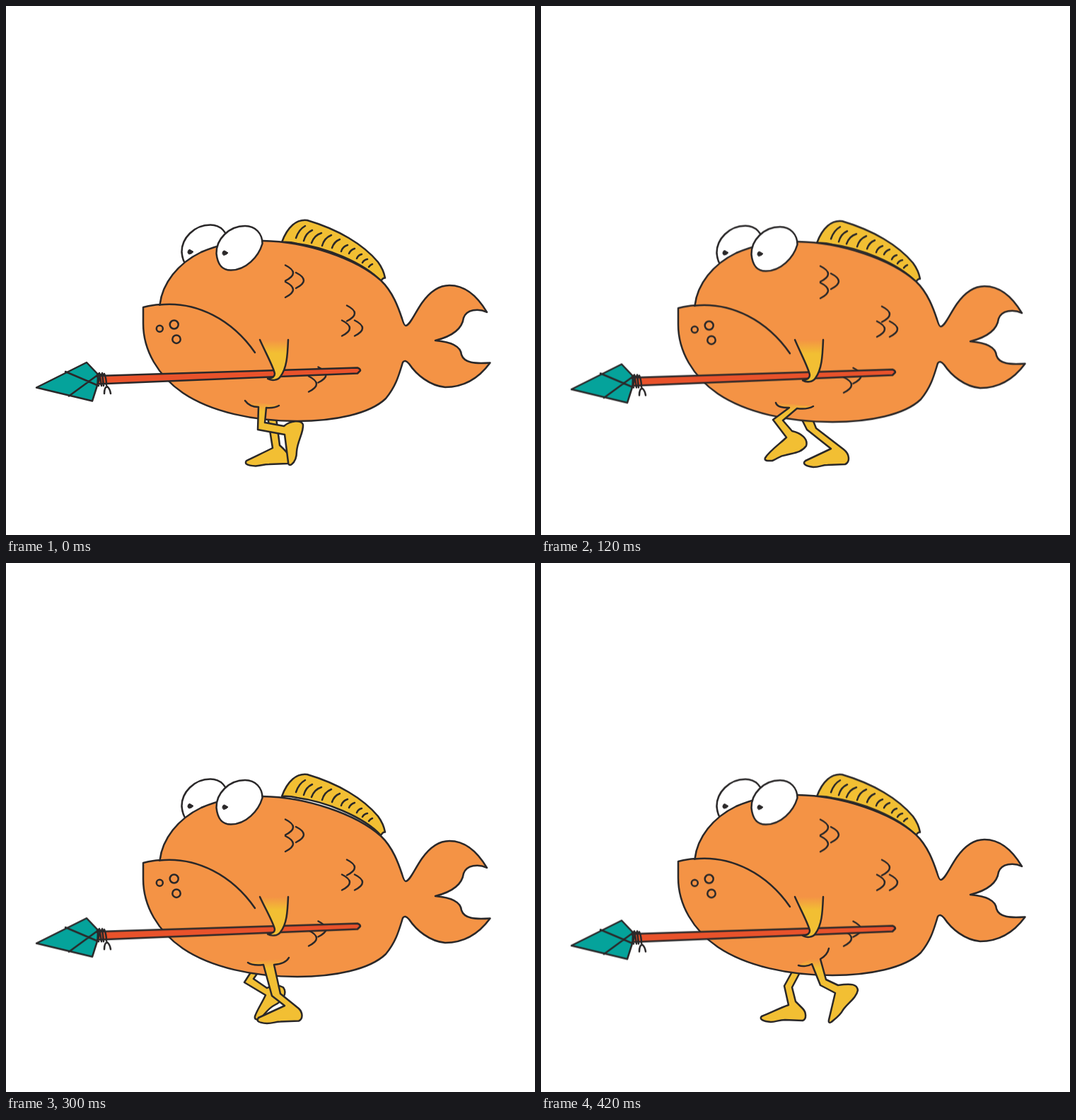
Write an HTML page that moves like this. It is 748 by 748 pixels and loops after 0.48 s.

```html
<!DOCTYPE html>
<html lang="en">
<head>
<meta charset="utf-8">
<title>Marching fish</title>
<style>
  html, body { margin: 0; width: 100%; height: 100%; overflow: hidden; background: #fff; }
  svg { display: block; width: 100%; height: 100%; overflow: hidden; }
  .ink { stroke: #2a2829; stroke-width: 2.5; stroke-linejoin: round; stroke-linecap: round; fill: none; }
  .orange { fill: #f49345; }
  .yellow { fill: #f2bf33; }
  .white { fill: #fff; }
  .red { fill: #e9522b; }
  .teal { fill: #05a39b; }
  .dark { fill: #2a2829; }

  .body, .face, .spear, .arm { animation: 480ms step-end infinite; }
  .body { animation-name: body; }
  .face { animation-name: face; }
  .spear { animation-name: spear; }
  .arm { animation-name: arm; transform-origin: 380px 472px; }

  /* Eight leg poses sit side by side; the strip jumps one stage width per step. */
  .legs { animation: walk 480ms steps(8) infinite; }
  .far { animation-delay: -240ms; }

  @keyframes walk { to { transform: translateX(-5984px); } }
  @keyframes body {
    0% { transform: translateY(0); }
    12.5% { transform: translateY(.7px); }
    25% { transform: translateY(1.2px); }
    37.5% { transform: translateY(-2.6px); }
    50% { transform: translateY(-5px); }
    62.5% { transform: translateY(-2px); }
    75% { transform: translateY(1.2px); }
    87.5% { transform: translateY(-4px); }
  }
  @keyframes face {
    0% { transform: translateY(0); }
    12.5% { transform: translateY(.7px); }
    25% { transform: translateY(1.3px); }
    37.5% { transform: translateY(-5px); }
    50% { transform: translateY(-7.4px); }
    62.5% { transform: translateY(-4px); }
    75% { transform: translateY(0); }
    87.5% { transform: translateY(-3.8px); }
  }
  @keyframes spear {
    0% { transform: translateY(0); }
    12.5% { transform: translateY(1.4px); }
    25% { transform: translateY(2.5px); }
    37.5% { transform: translateY(2.5px); }
    50% { transform: translateY(-1.2px); }
    62.5% { transform: translateY(-1.8px); }
    75% { transform: translateY(-2.4px); }
    87.5% { transform: translateY(1.5px); }
  }
  @keyframes arm {
    0% { transform: none; }
    12.5% { transform: scaleY(1.02); }
    25% { transform: scaleY(1.04); }
    37.5% { transform: scaleY(1); }
    50% { transform: scaleY(.96); }
    62.5% { transform: scaleY(.96); }
    75% { transform: scaleY(.96); }
    87.5% { transform: scaleY(1); }
  }
</style>
</head>
<body>
<svg viewBox="0 0 748 748">
  <defs>
    <linearGradient id="armTint" gradientUnits="userSpaceOnUse" x1="0" y1="472" x2="0" y2="491">
      <stop stop-color="#f49345"/><stop offset="1" stop-color="#f2bf33"/>
    </linearGradient>
    <linearGradient id="legTint" gradientUnits="userSpaceOnUse" x1="0" y1="560" x2="0" y2="573">
      <stop stop-color="#f49345"/><stop offset="1" stop-color="#f2bf33"/>
    </linearGradient>
    <path id="scale" d="M0 0C8 4 11 8 11 11S8 18 0 22"/>
    <g id="eye">
      <path class="white" d="M297.5 350C297 330 315 311 338 311C353 311 362.5 322 362.5 336C357 355 339 373.5 318 373.5C304 373.5 299 364 297.5 350Z"/>
      <path class="dark" stroke-width="1" d="M306 350Q306 346 309 346L314 349Q312 352 308 352.5Z"/>
    </g>
    <g id="strip" fill="url(#legTint)">
      <path d="M338 558C343 565 350 567 357 567L356 599L394 606L399 645C399 649 401 650 404 648C409 644 411 638 411 630C412 615 421 603 420 592C418 585 402 586 393 594L366 589L368 568Q379 569 386 565"/>
      <path transform="translate(748)" d="M335 560C339 566 345 568 353 568L337 593L367 611C362 622 355 632 352 641C351 646 356 647 361 643C366 638 370 630 380 625C392 619 398 608 392 600C385 596 377 597 369 601L350 588L364 568Q377 570 386 565"/>
      <path transform="translate(1496)" d="M332 561C334 567 341 568 351 568L328 585L347 610C339 618 323 629 317 639C315 644 323 643 327 643C335 640 337 636 346 635C356 632 368 632 375 622C378 612 368 604 355 601L342 586L362 569Q376 571 385 566"/>
      <path transform="translate(2244)" d="M340 558C347 563 353 568 360 569L344 598L350 625C338 629 325 636 312 641C308 645 314 648 325 649C333 649 335 646 345 646L370 647C376 645 375 635 370 630L360 620L355 600L372 568Q386 568 396 564"/>
      <path transform="translate(2992)" d="M341 563C350 568 360 568 368 568L377 625C365 631 350 638 340 643C337 647 340 650 353 650.5C360 650 365 648 372 648L398 647C403 645 403 638 399 634C395 628 390 624 387 621L380 567C390 567 398 563 402 558"/>
      <path transform="translate(3740)" d="M342 565C348 569 356 569 364 568L376 612L394 626L357 643C354 647 355 650 369 651C378 651 381 648.5 388 648.5L414 647.5C420 645 420 636 414 630L388 609L379 568C390 567 397 564 400 558"/>
      <path transform="translate(4488)" d="M344 567C346 570 352 569 361 569L376 599L410 626L374 643C370 646 371 650 385 652C395 652 397 649 405 649L430 648C437 645 437 634 428 627L389 597L378 569C390 567 396 564 398 558"/>
      <path transform="translate(5236)" d="M364 569C370 571 378 570 383 567L395 597L416 608L407 646C406 651 409 651 413 647C418 643 424 638 427 632C434 622 446 615 448 604C447 596 440 594 420 597L403 589L395 560C402 556 406 550 407 545"/>
    </g>
  </defs>

  <g class="ink">
    <g class="face">
      <path class="yellow" d="M390 334C398 312 411 301 426 303C470 316 505 337 526 362Q534 373 536 384.5Q533 384 530 389C505 362 450 341 412 336Q400 333 390 334Z"/>
      <path d="M410 328Q414 316 423 311M421 332Q424 321 433 317M432 335Q436 324 446 321M447 339Q450 328 460 324M461 342Q464 333 472 330M474 347Q476 340 483 338M485 350Q487 345 493 343M496 357Q498 352 503 351M504 363Q506 359 511 358M513 369Q515 366 518 365"/>
      <use href="#eye" x="-49" y="-1.5"/>
    </g>

    <use class="legs far" href="#strip"/>

    <g class="body">
      <path class="orange" d="M194 426C207 423 215 422 217.500 422.500C221 392 243 364 276 348C303 336 332 331 363 332C425 333 495 357 530 388C547 404 555 427 560 442Q563 452 565 452C571 452 577 436 588 420C600 403 613 395 627 395C650 395 667 411 680 433C668 427 651 429 647 441C645 457 631 467 607 473C632 475 643 482 644 493C648 505 663 506 684.500 504.500C668 527 648 539 621 539C599 537 580 521 570 506Q564 499 561 504C556 520 552 537 537 555C514 577 464 587 412 587C350 587 290 574 250 547C215 523 194 487 194 449Z"/>
      <path d="M217 422.500C270 417 320 444 352 490"/>
    </g>

    <g class="face">
      <use href="#eye"/>
      <circle cx="217.300" cy="456.200" r="4.500"/>
      <circle cx="237.700" cy="450.500" r="6"/>
      <circle cx="241" cy="471.200" r="5.700"/>
      <use href="#scale" x="395" y="366.500"/>
      <use href="#scale" x="395" y="390"/>
      <use href="#scale" x="410" y="377"/>
      <use href="#scale" x="482" y="423.500"/>
      <use href="#scale" x="475" y="444.500"/>
      <use href="#scale" x="493" y="444.500"/>
      <use href="#scale" x="441.500" y="510.500"/>
      <use href="#scale" x="428" y="523.500"/>
    </g>

    <use class="legs" href="#strip"/>

    <g class="spear">
      <path class="red" d="M130 523L497 511.500Q501 513 501 515.500L497 519.500L130 534.500Z"/>
      <path class="teal" d="M43 539.500L114 504L133 524L122 558.500Z"/>
      <path d="M84 517L131 537M89 551.500L132 520M130 520L129.500 536M132 519L135 537M136 519L138 537M139 520Q142 527 142 536M129 521L138 521M139 548Q139 539 143 538Q147 541 148 548"/>
    </g>

    <path class="arm" fill="url(#armTint)" style="fill:url(#armTint)" d="M359 472C367 490 379 512 380 520Q380 526 370 527C375 530 384 530 388 524C397 512 398 495 399 472"/>
  </g>
</svg>
</body>
</html>
```
